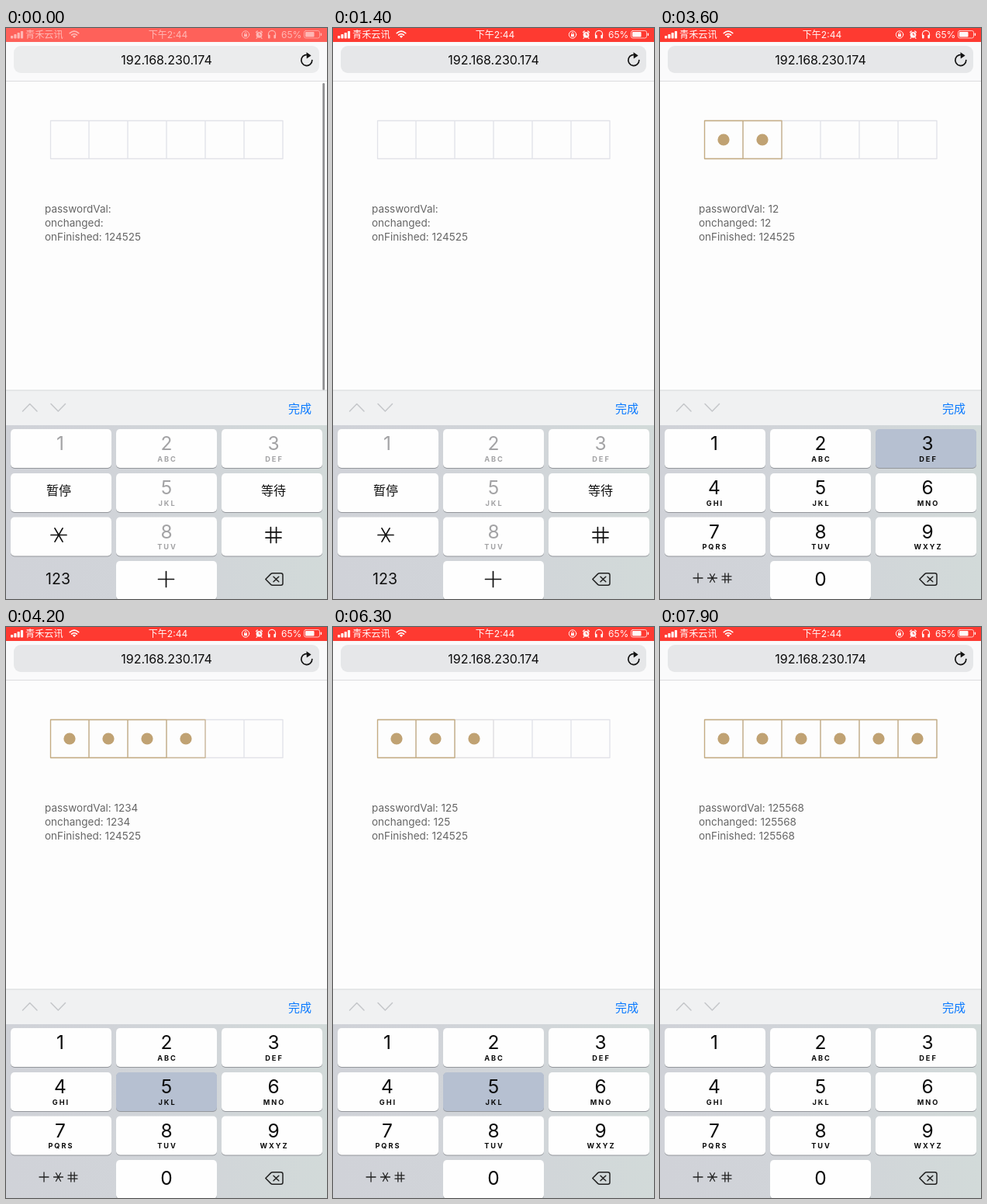
An HTML page for the animation above (8 s loop, 414 by 736 pixels).

```html
<!DOCTYPE html>
<html lang="zh">
<head>
<meta charset="utf-8">
<title>Password input</title>
<style>
html, body { margin: 0; width: 100%; height: 100%; overflow: hidden; background: #fdfdfd; }
svg { display: block; width: 414px; height: 736px; }
text { font-family: Inter, "Noto Sans CJK SC", "Noto Sans CJK", sans-serif; white-space: pre; }
.cjk { font-family: "Noto Sans CJK SC", "Noto Sans CJK", sans-serif; }
.mid { text-anchor: middle; }
.ln { fill: none; stroke-linecap: round; stroke-linejoin: round; }
</style>
</head>
<body>
<svg id="stage" viewBox="0 0 414 736" xmlns="http://www.w3.org/2000/svg">
  <defs>
    <linearGradient id="board">
      <stop offset="0" stop-color="#d0d2d8"/>
      <stop offset=".6" stop-color="#d1d5d9"/>
      <stop offset="1" stop-color="#d2dad9"/>
    </linearGradient>
  </defs>
</svg>
<script>
const NS = 'http://www.w3.org/2000/svg';
const stage = document.getElementById('stage');
const LOOP = 8000, GOLD = '#c0a273';

function add(parent, tag, attrs, content) {
  const el = document.createElementNS(NS, tag);
  for (const k in attrs) el.setAttribute(k, attrs[k]);
  if (content !== undefined) el.textContent = content;
  parent.appendChild(el);
  return el;
}
const group = (parent = stage) => add(parent, 'g', {});
const rect = (p, x, y, width, height, fill, rx = 0) =>
  add(p, 'rect', { x, y, width, height, fill, rx });
const text = (p, x, y, size, fill, str, more = {}) =>
  add(p, 'text', { x, y, 'font-size': size, fill, ...more }, str);
const line = (p, d, stroke, width) =>
  add(p, 'path', { d, stroke, 'stroke-width': width, class: 'ln' });

// Page and address bar
rect(stage, 0, 0, 414, 736, '#fdfdfd');
rect(stage, 0, 18, 414, 50, '#fafafb');
rect(stage, 0, 68, 414, 1, '#dcdcde');
const pill = rect(stage, 10, 23, 394, 35, '#e6e7e9', 9);
text(stage, 207, 46.5, 16, '#0c0c0c', '192.168.230.174', { class: 'mid' });
line(stage, 'M391.5 35.6A7 7 0 1 0 394.8 41.5', '#111', 1.7);
add(stage, 'path', { d: 'M387.5 31.2L393.6 35.6L387.8 39.6Z', fill: '#111' });

// Status bar
rect(stage, 0, 0, 414, 18, '#fe3a31');
const bar = group();
for (let i = 0; i < 4; i++) rect(bar, 6 + i * 4.3, 10 - i * 2, 3.2, 3.5 + i * 2, '#fff', .7);
text(bar, 25, 13, 12.2, '#fff', '青禾云讯', { class: 'cjk' });
line(bar, 'M82.3 6.6Q88 1.8 93.7 6.6M84.6 9Q88 6.2 91.4 9', '#fff', 1.7);
add(bar, 'path', { d: 'M85.8 10.6Q88 9 90.2 10.6L88 13Z', fill: '#fff' });
text(bar, 209, 13, 12, '#fff', '下午2:44', { class: 'mid' });
add(bar, 'circle', { cx: 309, cy: 8.5, r: 4.7, class: 'ln', stroke: '#fff' });
rect(bar, 307, 8, 4, 3.2, '#fff');
line(bar, 'M307.8 8V7A1.2 1.2 0 0 1 310.2 7V8', '#fff', .8);
add(bar, 'circle', { cx: 326.5, cy: 8.8, r: 3.9, fill: '#fff' });
line(bar, 'M322.5 5.5L324.3 4M330.5 5.5L328.7 4M323.8 12.6L323 13.4M329.2 12.6L330 13.4', '#fff', 1.2);
line(bar, 'M326.5 6.8V9H328.3', '#fe3a31', .9);
line(bar, 'M338.4 9.8V8A4.6 4.6 0 0 1 347.6 8V9.8', '#fff', 1.1);
rect(bar, 338, 8.8, 2.6, 4.6, '#fff', 1);
rect(bar, 345.4, 8.8, 2.6, 4.6, '#fff', 1);
text(bar, 355, 13, 12, '#fff', '65%');
add(bar, 'rect', { x: 384.5, y: 3.5, width: 20, height: 9.5, rx: 2.2, class: 'ln', stroke: '#fff', 'stroke-opacity': .75 });
rect(bar, 386, 5, 11.5, 6.5, '#fff', 1);
rect(bar, 405.7, 6.5, 1.4, 3.6, '#fff', .7);
const veil = rect(stage, 0, 0, 414, 18, '#fff');

// Scroll indicator
const scroller = rect(stage, 408.3, 71, 2.7, 396, '#8e8e90', 1.3);

// Password cells
const cellPath = i => {
  const x = 57.5 + i * 50;
  return `M${x} 119.5H${x + 49.5}V168.5H${x}` + (i ? '' : 'Z');
};
const cells = [], dots = [];
for (let i = 0; i < 6; i++) line(stage, cellPath(i), '#e1e2e8', 1.3);
for (let i = 0; i < 6; i++) {
  cells.push(line(stage, cellPath(i), '#c4ab80', 1.3));
  dots.push(add(stage, 'circle', { cx: 82 + i * 50, cy: 144, r: 7.6, fill: GOLD }));
}
const labels = [238, 256, 274].map(y => text(stage, 50, y, 13.5, '#666', ''));

// Keyboard
rect(stage, 0, 467, 414, 45, '#f0f1f2');
rect(stage, 0, 466.5, 414, 1, '#d6d7d9');
line(stage, 'M21.5 494L30.7 484.5L40 494M58 484.5L67.3 494L76.5 484.5', '#c5c7ca', 1.5);
text(stage, 364, 495.5, 15, '#0a7aff', '完成', { class: 'cjk', 'font-weight': 500 });
rect(stage, 0, 512, 414, 224, 'url(#board)');

const colX = [6, 142, 278], midX = [70, 207, 345], rowY = [517, 574, 630.5, 687];
const faces = {};
function keyFace(id, col, row) {
  rect(stage, colX[col], rowY[row] + 1, 130, 50, '#93969b', 5);
  faces[id] = rect(stage, colX[col], rowY[row], 130, 50, '#fefefe', 5);
}
for (let n = 1; n <= 9; n++) keyFace(n, (n - 1) % 3, Math.floor((n - 1) / 3));
keyFace(0, 1, 3);
faces.mode = rect(stage, 6, 687, 130, 50, '#fefefe', 5);
faces.del = rect(stage, 278, 687, 130, 50, '#fefefe', 5);

const names = ['', 'ABC', 'DEF', 'GHI', 'JKL', 'MNO', 'PQRS', 'TUV', 'WXYZ'];
function digit(p, n, color) {
  const c = (n - 1) % 3, y = rowY[Math.floor((n - 1) / 3)];
  text(p, midX[c], y + 27, 24.5, color, n, { class: 'mid' });
  text(p, midX[c] + 1, y + 41.5, 9.2, color, names[n - 1],
    { class: 'mid', 'font-weight': 700, 'letter-spacing': 2 });
}
const plus = (x, y, r) => `M${x - r} ${y}H${x + r}M${x} ${y - r}V${y + r}`;
const star = (x, y, r) => `M${x - r} ${y}H${x + r}` +
  `M${x - r / 2} ${y - r * .87}L${x + r / 2} ${y + r * .87}` +
  `M${x + r / 2} ${y - r * .87}L${x - r / 2} ${y + r * .87}`;
const hash = (x, y, r) => {
  const k = r * .36;
  return `M${x - r} ${y - k}H${x + r}M${x - r} ${y + k}H${x + r}` +
    `M${x - k} ${y - r}V${y + r}M${x + k} ${y - r}V${y + r}`;
};

const symbols = group(), numbers = group();
[1, 2, 3, 5, 8].forEach(n => digit(symbols, n, '#a3a3a5'));
text(symbols, 68, 602, 16, '#111', '暂停', { class: 'cjk mid', 'font-weight': 500 });
text(symbols, 345, 602, 16, '#111', '等待', { class: 'cjk mid', 'font-weight': 500 });
line(symbols, star(68, 653.5, 10) + hash(345, 653.5, 10) + plus(206.5, 710.5, 10), '#111', 1.7);
text(symbols, 67, 716.5, 19.5, '#111', '123', { class: 'mid' });

for (let n = 1; n <= 9; n++) digit(numbers, n, '#0c0c0c');
text(numbers, 207, 719, 24.5, '#0c0c0c', '0', { class: 'mid' });
line(numbers, plus(49, 709, 6) + star(67.5, 709, 6) + hash(86, 709, 6), '#222', 1.3);

const back = line(stage, 'M334.8 710.5L341.6 703.6Q342.6 702.7 344 702.7H354.5Q357 702.7 357 705.2V715.8Q357 718.3 354.5 718.3H344Q342.6 718.3 341.6 717.4Z', '#222', 1.5);
const cross = line(stage, 'M345 707.2L351.8 713.8M351.8 707.2L345 713.8', '#222', 1.5);

// Key presses: key, down, up
const presses = [
  ['mode', 1900, 2000], [1, 2840, 3000], [2, 3180, 3340], [3, 3540, 3700],
  [4, 3840, 3990], [5, 4150, 4310], ['del', 4600, 4760], ['del', 5090, 5250],
  ['del', 5640, 5860], [5, 6150, 6350], [5, 6480, 6640], [6, 6780, 6940], [8, 7370, 7560]
];
const edits = [
  [0, ''], [2960, '1'], [3300, '12'], [3650, '123'], [3950, '1234'], [4290, '12345'],
  [4700, '1234'], [5200, '123'], [5700, '12'], [6240, '125'], [6600, '1255'],
  [6890, '12556'], [7490, '125568']
];

const clamp = v => Math.max(0, Math.min(1, v));
const smooth = v => v * v * (3 - 2 * v);
const show = (el, on) => el.setAttribute('visibility', on ? 'visible' : 'hidden');

// Border level of one cell, fading after each fill or clear
function cellLevel(i, t) {
  let on = false, since = -1e4;
  for (const [at, val] of edits) {
    if (at <= t && (val.length > i) !== on) { on = !on; since = at; }
  }
  const k = smooth(clamp((t - since) / 360));
  return on ? k : 1 - k;
}

function draw(t) {
  const val = edits.filter(e => e[0] <= t).pop()[1];
  const down = new Set(presses.filter(p => t >= p[1] && t < p[2]).map(p => p[0]));
  const intro = 1 - smooth(clamp(t / 600));

  veil.setAttribute('opacity', .2 * intro);
  bar.setAttribute('opacity', .96 - .42 * intro);
  pill.setAttribute('opacity', 1 - .25 * intro);
  scroller.setAttribute('opacity', 1 - clamp((t - 150) / 450));

  for (let i = 0; i < 6; i++) {
    cells[i].setAttribute('opacity', cellLevel(i, t));
    show(dots[i], val.length > i);
  }
  labels[0].textContent = 'passwordVal: ' + val;
  labels[1].textContent = 'onchanged: ' + val;
  labels[2].textContent = 'onFinished: ' + (val.length === 6 ? val : '124525');

  for (let n = 0; n <= 9; n++) faces[n].setAttribute('fill', down.has(n) ? '#b6c0d1' : '#fefefe');
  show(faces.mode, down.has('mode'));
  show(faces.del, down.has('del'));
  back.style.fill = down.has('del') ? '#222' : 'none';
  cross.setAttribute('stroke', down.has('del') ? '#fff' : '#222');
  show(symbols, t < 2000);
  show(numbers, t >= 2000);
}

const start = performance.now();
function tick() {
  draw((performance.now() - start) % LOOP);
  requestAnimationFrame(tick);
}
tick();
</script>
</body>
</html>
```
